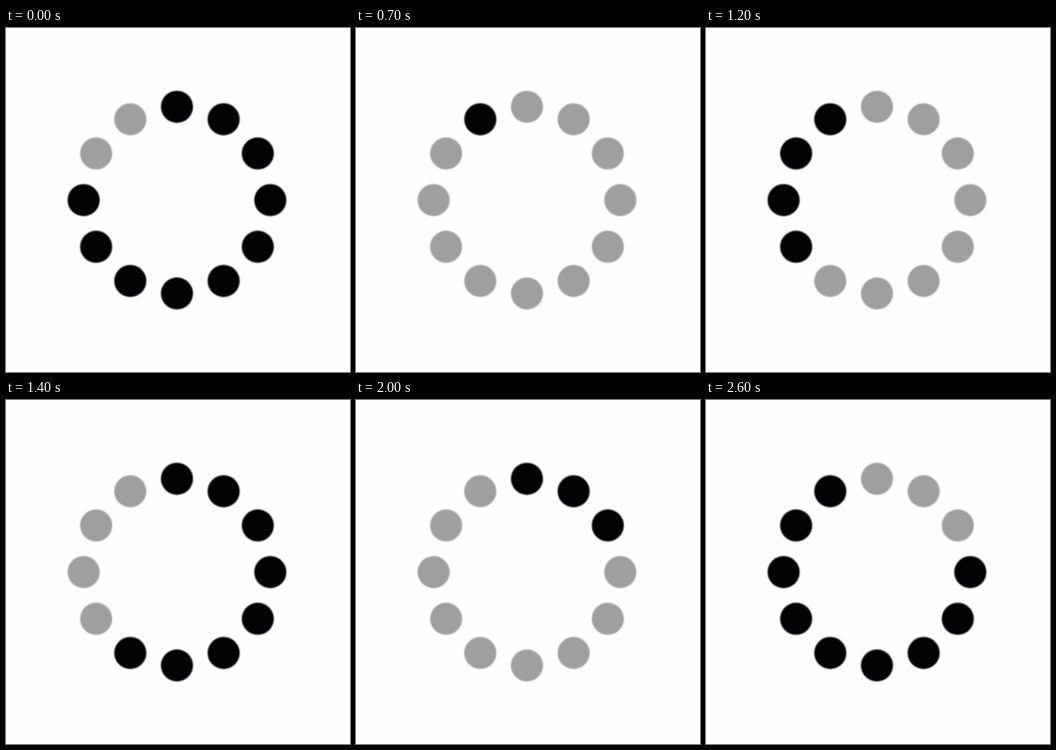
Write an HTML page with a canvas that moves like this. It is 600 px wide and 600 px high and loops after 2.7 s.

```html
<!DOCTYPE html>
<html lang="en">
<head>
<meta charset="utf-8">
<title>Dot spinner</title>
<style>
  html, body { margin: 0; width: 100%; height: 100%; overflow: hidden; background: #fefefe; }
  canvas { display: block; }
</style>
</head>
<body>
<canvas id="stage" width="600" height="600"></canvas>
<script>
const ctx = document.getElementById('stage').getContext('2d');

const STEP = 100;
const STEPS = 27;
const DOTS = 12;
const CENTER = { x: 298.2, y: 300.2 };
const RING = 162.8;
const RADIUS = 28;
const DARK = '#020103';
const LIGHT = '#9f9f9f';

// [step, wipe phase]; 24 phases make one light wipe followed by one dark wipe.
const KEYS = [[0, 22], [4, 1], [9, -23], [14, -52], [18, -74], [22, -88], [26, -117], [27, -122]];

function phaseAt(step) {
  const next = KEYS.findIndex(([at]) => at > step);
  const [t0, p0] = KEYS[next - 1];
  const [t1, p1] = KEYS[next];
  const phase = Math.round(p0 + (p1 - p0) * (step - t0) / (t1 - t0));
  const cycle = 2 * DOTS;
  return ((phase % cycle) + cycle) % cycle;
}

function isLight(dot, phase) {
  return phase <= DOTS ? dot < phase : dot >= phase - DOTS;
}

function drawDot(dot, color) {
  const angle = dot / DOTS * Math.PI * 2 - Math.PI / 2;
  ctx.fillStyle = color;
  ctx.beginPath();
  ctx.arc(CENTER.x + RING * Math.cos(angle), CENTER.y + RING * Math.sin(angle), RADIUS, 0, Math.PI * 2);
  ctx.fill();
}

function draw(time) {
  const phase = phaseAt(Math.floor(time / STEP) % STEPS);
  ctx.filter = 'none';
  ctx.fillStyle = '#fefefe';
  ctx.fillRect(0, 0, 600, 600);
  ctx.filter = 'blur(0.8px)';
  for (let dot = 0; dot < DOTS; dot++) {
    drawDot(dot, isLight(dot, phase) ? LIGHT : DARK);
  }
}

const start = performance.now();

function tick() {
  draw(performance.now() - start);
  requestAnimationFrame(tick);
}

tick();
</script>
</body>
</html>
```
